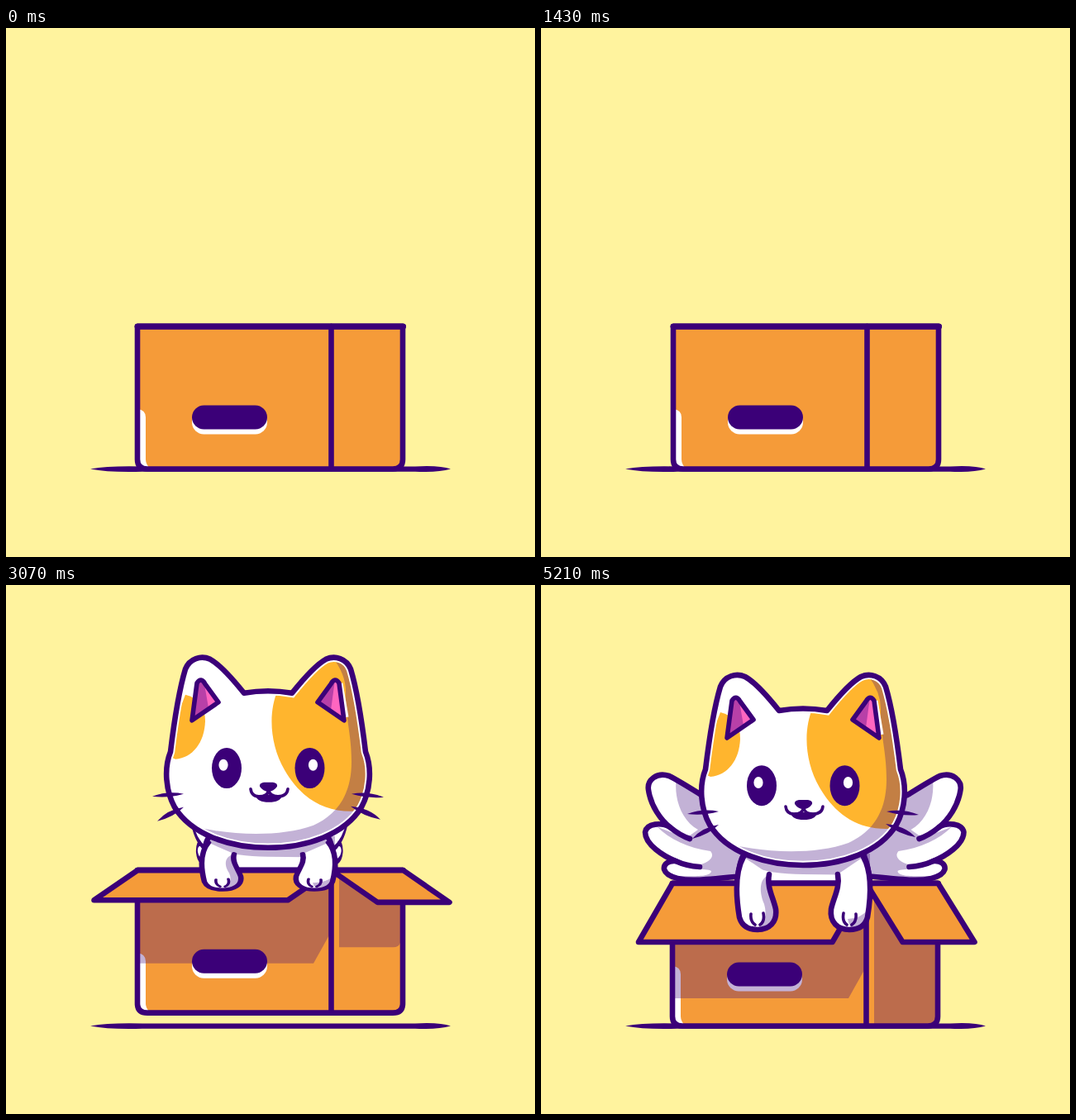
An HTML page for the animation above (6070 ms loop, 640 by 640 pixels).

```html
<!DOCTYPE html>
<html lang="en">
<head>
<meta charset="utf-8">
<title>Cat in a box</title>
<style>
  html, body { margin: 0; width: 100%; height: 100%; overflow: hidden; background: #fff39e; }
  svg { display: block; width: 100%; height: 100%; }
  .ink { fill: #3b0078; }
  .line { fill: none; stroke: #3b0078; stroke-width: 6.6; stroke-linecap: round; stroke-linejoin: round; }
  .thin { stroke-width: 3.6; }
  .white { fill: #fff; }
  .card { fill: #f59b39; }
  .fur { fill: #ffb52e; }
  .shade { fill: #3b0078; fill-opacity: .3; }
  .pink { fill: #ff66c0; }
  .plum { fill: #b840a8; }
</style>
</head>
<body>
<svg viewBox="0 0 640 640">
  <defs>
    <path id="head" d="M288 152C272 132 258 117 247 111C236 106 222 110 217 123C208 153 203 190 199 223C191 243 193 270 204 290C224 323 270 339 317 339S410 323 430 290C441 270 443 243 435 223C431 190 426 153 417 123C412 110 398 106 387 111C376 117 362 132 346 152Q317 147 288 152Z"/>
    <path id="wingShape" d="M250 270L194 254C178 244 165 236 155 231C140 226 128 236 130 248C133 268 145 284 156 293C146 287 128 288 126 299C126 314 148 328 163 334C154 333 148 338 149 344C152 354 172 359 200 356C218 355 230 353 245 352Z"/>
    <path id="earShape" d="M225 185L231 140Q236 132 241 141L257 163Z"/>
    <path id="armShape" d="M245 329C236 345 235 372 240 402C243 413 252 417 262 417C276 417 286 408 284 392C281 378 273 366 276 350"/>
    <path id="boxShape" d="M159 361V522Q159 533.5 171 533.5H468Q480 533.5 480 522V361Z"/>
    <clipPath id="inHead"><use href="#head"/></clipPath>
    <clipPath id="inWing"><use href="#wingShape"/></clipPath>
    <clipPath id="inBox"><use href="#boxShape"/></clipPath>
    <clipPath id="aboveBox"><rect id="opening" y="-100" width="640" height="461"/></clipPath>
    <g id="wing">
      <use href="#wingShape" class="white"/>
      <g clip-path="url(#inWing)">
        <path class="shade" d="M164 232C160 258 170 285 190 296L176 306C160 300 148 296 140 292C156 308 178 318 205 322C212 330 200 338 188 339L160 335C176 346 200 342 206 346C206 354 180 352 166 352V362H260V232Z"/>
      </g>
      <path class="line" d="M156 293Q168 303 180 307M163 334Q176 340 192 341"/>
      <use href="#wingShape" class="line"/>
    </g>
  </defs>

  <path class="ink" d="M102 533.5Q125 529.3 165 530.4H495Q525 528.8 538 533.5Q522 538 495 536.8H165Q125 538 102 533.5Z"/>

  <g clip-path="url(#aboveBox)">
    <g id="cat">
      <g id="wingL"><use href="#wing"/></g>
      <g id="wingR"><use href="#wing"/></g>
      <path class="white" d="M245 325Q236 340 236 400H399Q400 345 390 325Z"/>
      <path class="shade" d="M246 325V336Q270 350 317 350T398 352V325Z"/>
      <path class="line" d="M245 327Q236 340 236 400M390 327Q399 340 400 400"/>

      <use href="#head" class="white"/>
      <g clip-path="url(#inHead)">
        <path class="fur" d="M329 148C317 175 319 214 337 245C356 278 386 300 432 294L450 250V100H385L346 148Z"/>
        <path class="fur" d="M217 154Q241 160 241 186C240 212 226 230 205 232L190 225Z"/>
        <path class="shade" d="M393 106Q411 128 411 150C410 180 418 200 418 235C418 278 398 300 372 312C330 327 270 324 226 313L250 350H400L450 290V106Z"/>
        <use href="#head" fill="none" stroke="#fff" stroke-width="10.5"/>
      </g>
      <path d="M405 140L412 181" stroke="#fff" stroke-width="5"/>
      <use href="#earShape" class="pink"/>
      <path class="plum" d="M225 185L231 140Q236 132 240 141L245 170Z"/>
      <use href="#earShape" class="line" style="stroke-width:5.6"/>
      <g transform="matrix(-1 0 0 1 634 0)">
        <use href="#earShape" class="pink"/>
        <path class="plum" d="M257 163L236 136L241 173Z"/>
        <use href="#earShape" class="line" style="stroke-width:5.6"/>
      </g>
      <use href="#head" class="line"/>

      <g class="ink">
        <ellipse cx="267" cy="242.7" rx="18" ry="24.5"/>
        <ellipse cx="367.5" cy="242.7" rx="18" ry="24.5"/>
        <path d="M312 260H323Q329 261 328 265Q324 271 317.5 271T307 265Q306 261 312 260Z"/>
        <path id="mouth"/>
        <path d="M177 277Q196 270 215 274Q196 279.500 177 277ZM183 307Q195 293 215 290Q203 302 183 307ZM418 274Q438 270 457 278Q438 280 418 274ZM417 289Q440 291 453 305Q432 301 417 289Z"/>
      </g>
      <ellipse class="white" cx="263" cy="239" rx="5.600" ry="7"/>
      <ellipse class="white" cx="371.5" cy="239" rx="5.600" ry="7"/>
      <path class="line thin" d="M296 268Q297 277 306 277Q317 277 317.500 269Q319 277 329 277Q340 277 341 268"/>
    </g>
  </g>

  <g id="box">
    <use href="#boxShape" class="card"/>
    <g clip-path="url(#inBox)">
      <path class="white" d="M159 461Q169 462 169 471V522Q169 528 175 534H159Z"/>
      <rect class="white" x="225" y="462" width="91" height="29.500" rx="14.500"/>
      <path id="shadeL" class="shade"/>
      <path id="shadeR" class="shade"/>
    </g>
    <rect class="ink" x="225" y="456.500" width="91" height="29" rx="14.500"/>
    <path class="line" d="M393.500 361V533"/>
    <use href="#boxShape" class="line"/>
    <path class="line" style="stroke-width:7.300" d="M159.300 361.200H480.300"/>
    <path id="flapR" class="line card" style="fill:#f59b39"/>
    <path id="flapL" class="line card" style="fill:#f59b39"/>
  </g>

  <g id="arms">
    <use href="#armShape" class="white"/>
    <path class="shade" d="M274 352C264 356 264 372 270 386C274 400 270 410 262 417C280 416 286 406 284 392C281 378 273 366 276 350Z"/>
    <use href="#armShape" class="line"/>
    <g transform="matrix(-1 0 0 1 635 0)">
      <use href="#armShape" class="white"/>
      <path class="shade" d="M239 392Q248 404 264 404Q262 413 258 417Q242 414 239 392Z"/>
      <use href="#armShape" class="line"/>
    </g>
    <path class="line thin" d="M254 398Q253 407 259 411M269 397Q271 407 265 411M366 397Q364 407 370 411M381 398Q382 407 376 411"/>
  </g>
</svg>
<script>
const LOOP = 6070, STEP = LOOP / 85;
const $ = id => document.getElementById(id);
const set = (id, name, value) => $(id).setAttribute(name, value);
const move = (id, value) => set(id, 'transform', value);

// Eased value at k through [time, value] keys.
function track(k, ...keys) {
  if (k <= keys[0][0]) return keys[0][1];
  for (let i = 1; i < keys.length; i++) {
    const [a, u] = keys[i - 1], [b, v] = keys[i];
    if (k <= b) {
      const p = (k - a) / (b - a);
      return u + (v - u) * p * p * (3 - 2 * p);
    }
  }
  return keys[keys.length - 1][1];
}

const flap = (x1, x2, dx, dy) =>
  `M${x1} 361H${x2}L${x2 + dx} ${361 + dy}H${x1 + dx}Z`;

function draw(k) {
  // Box: hop right and back, jump, then burst open.
  const x = track(k, [0, 0], [10, 56], [20, 1], [22, 0]);
  let y = track(k, [21, 0], [25.5, -51], [30, -3.5], [34, 0], [36, 0], [40, -45], [45, 0]);
  let turn = 0;
  if (k < 20) {
    const hop = Math.sin(Math.PI * k / 10) ** 3;
    y -= 9 * Math.abs(hop);
    turn = 4.4 * hop;
  } else if (k > 21 && k < 30) {
    turn = 4 * Math.sin(2 * Math.PI * (k - 21) / 9);
  }
  move('box', `translate(${x} ${y}) rotate(${turn} 319.5 447)`);
  set('opening', 'height', 461 + y);

  set('flapL', 'd', flap(159, 393.5,
    track(k, [36, 0], [39, -29], [41, -60], [45, -45], [48, -41]),
    track(k, [36, 0], [39, -72], [45, 74], [48, 71])));
  set('flapR', 'd', flap(393.5, 480.5,
    track(k, [36, 0], [39, 3.5], [41, 64], [45, 48], [48, 44]),
    track(k, [36, 0], [39, -62], [45, 74], [48, 71])));

  const left = 361 + track(k, [36, 0], [39, 37], [45, 139]);
  const right = 361 + track(k, [36, 0], [39, 13], [47, 173]);
  set('shadeL', 'd', `M162 361H391V${Math.max(361, left - 34)}L372 ${left}H162Z`);
  set('shadeR', 'd', `M403 361H477V${Math.max(361, right - 6)}Q476 ${right} 468 ${right}H403Z`);

  // Cat
  const rise = track(k, [36, 260], [39, -24], [40, -31], [48, 0]);
  move('cat', `translate(0 ${rise})`);
  const spread = track(k, [44, .3], [48, .61], [54, 1.01], [56, 1]);
  const shift = 266 * (1 - spread);
  move('wingL', `matrix(${spread} 0 0 1 ${shift} 0)`);
  move('wingR', `matrix(${-spread} 0 0 1 ${637.5 - shift} 0)`);

  const reach = track(k, [40, 0], [45, 1]);
  move('arms', `translate(0 ${rise + 340 * (1 - reach)}) scale(1 ${reach})`);
  set('arms', 'visibility', reach > 0 ? 'visible' : 'hidden');

  const lip = k === 71 || k === 72 ? 294 : 284;
  set('mouth', 'd', `M302 276Q318 274 334 276Q332 ${lip} 318 ${lip}T302 276Z`);
}

const start = performance.now();
function tick() {
  const t = (performance.now() - start) % LOOP;
  draw(Math.floor((t + 6) / STEP) % 85);
  requestAnimationFrame(tick);
}
tick();
</script>
</body>
</html>
```
